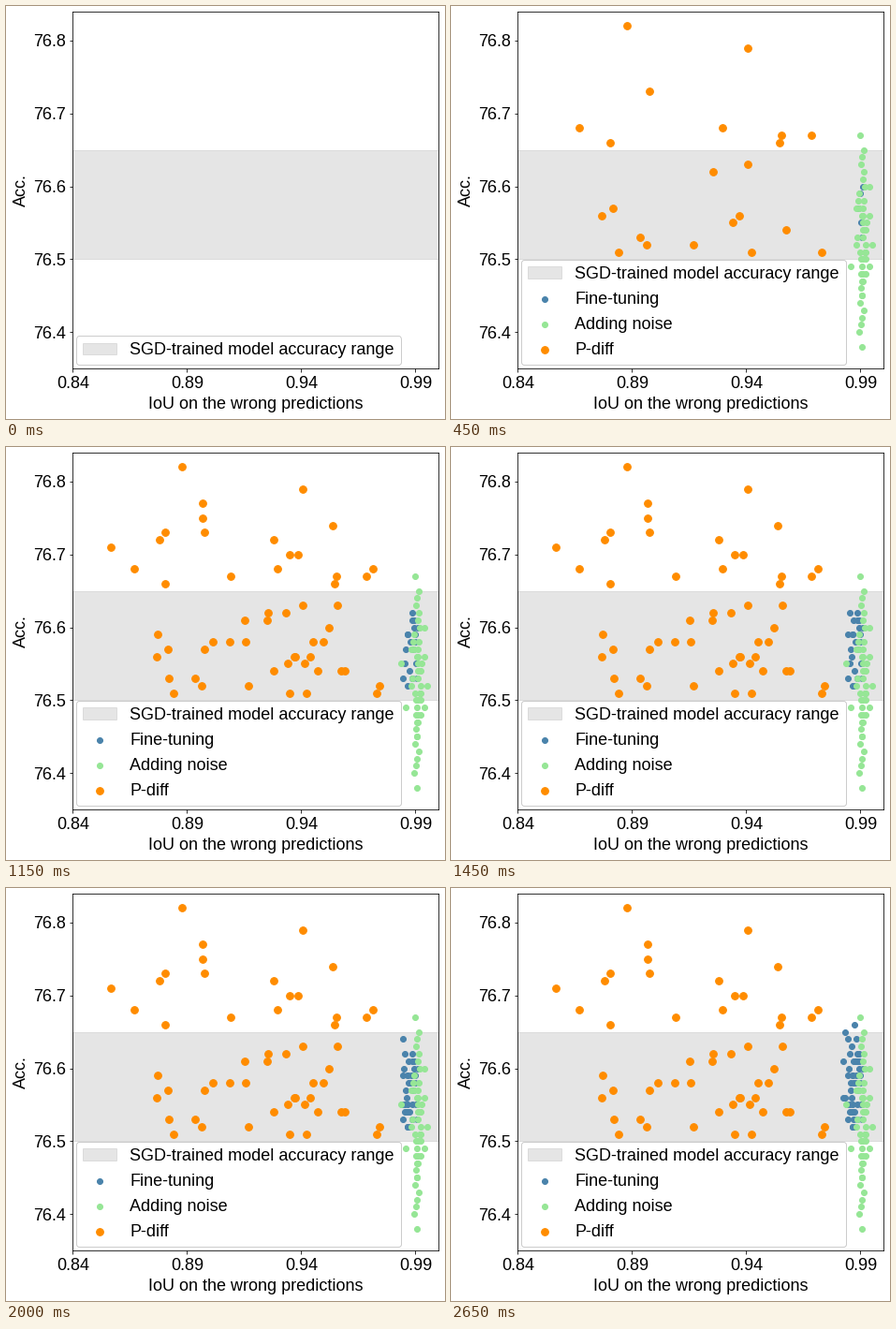
These frames come from a looping animation (469x441 px, 2.7 s). A matplotlib script:

```python
import math
import random

import matplotlib.pyplot as plt
from matplotlib.animation import FuncAnimation

W, H, DPI = 469, 441, 72
FRAMES, INTERVAL = 54, 50

plt.rcParams.update({"font.family": "Liberation Sans", "font.size": 18})

# P-diff results above the accuracy band: (IoU * 1e4, hundredths above 76).
HIGH = [(8880, 82), (9407, 79), (8975, 73), (8671, 68), (9296, 68),
        (8805, 66), (9544, 66), (9552, 67), (9685, 67), (8565, 71),
        (8968, 75), (8805, 73), (9280, 72), (9349, 70), (9388, 70),
        (9093, 67), (9712, 68), (8968, 77), (8780, 72), (9538, 74)]


def accuracy(hundredths):
    """Accuracies are reported to two decimals."""
    return 76 + round(hundredths) / 100


def fine_tuned(n=47):
    """Drifts away from IoU 0.99 while the accuracy range widens."""
    rng = random.Random(4)
    points = []
    for k in range(n):
        t = k / n
        iou = rng.gauss(0.9858 + 0.0045 * math.exp(-5 * t), 0.0018)
        points.append((max(iou, 0.9823), accuracy(rng.uniform(51, 61 + 6 * t))))
    return points


def noisy(n=51):
    """A dense column with long tails in accuracy, widest in the middle."""
    rng = random.Random(2)
    points = []
    for k in range(n):
        u = (2 * k + 1) / n - 1
        center = 0.9917 - (0.003 * u**6 if u < 0 else 0.0005 * u)
        spread = 0.0006 + 0.0018 * (1 - u * u) ** 2
        iou = min(rng.gauss(center, spread), 0.9975)
        points.append((iou, accuracy(52.5 + 8.5 * u + 6.5 * u**5)))
    rng.shuffle(points)
    return points


def diffused(n=54):
    """Two of every five results lie above the band, the rest inside it."""
    rng = random.Random(7)
    high = iter(HIGH)
    points = []
    for k in range(n):
        top = next(high, None) if k % 5 in (0, 2) else None
        if top:
            points.append((top[0] / 1e4, accuracy(top[1])))
        else:
            points.append((rng.triangular(0.856, 0.984, 0.945),
                           accuracy(rng.uniform(50, 64))))
    return points


# label, points, colour, marker area, points per frame, lag
SERIES = [
    ("Fine-tuning", fine_tuned(), "#4a83ab", 36, 0.95, 3.3),
    ("Adding noise", noisy(), "#96e696", 36, 5.5, 0),
    ("P-diff", diffused(), "darkorange", 60, 2.42, 0),
]

fig = plt.figure(figsize=(W / DPI, H / DPI), dpi=DPI, facecolor="white")
ax = fig.add_axes([71.3 / W, 54 / H, 390.6 / W, 381.2 / H])
ax.set_xlim(0.84, 1.0)
ax.set_ylim(76.35, 76.84)
xticks = [0.84 + 0.05 * k for k in range(4)]
yticks = [76.4 + 0.1 * k for k in range(5)]
ax.set_xticks(xticks, [f"{v:.2f}" for v in xticks])
ax.set_yticks(yticks, [f"{v:.1f}" for v in yticks])
ax.tick_params(axis="x", pad=4.5)
ax.set_xlabel("IoU on the wrong predictions", labelpad=5.5)
ax.set_ylabel("Acc.")

band = ax.axhspan(76.5, 76.65, color="gray", alpha=0.2,
                  label="SGD-trained model accuracy range")
clouds = []
for label, points, color, size, rate, lag in SERIES:
    dots = ax.scatter([], [], s=size, color=color, label=label)
    clouds.append((dots, points, rate, lag))


def update(i):
    handles = [band]
    for dots, points, rate, lag in clouds:
        count = max(1, round(rate * i - lag)) if i else 0
        dots.set_offsets(points[:count] or [(0, 0)])
        if i:
            handles.append(dots)
    ax.legend(handles=handles, loc="lower left", borderaxespad=0.2,
              labelspacing=0.56, framealpha=1)
    return [dots for dots, *_ in clouds]


anim = FuncAnimation(fig, update, frames=FRAMES, interval=INTERVAL,
                     repeat=True, repeat_delay=0, blit=False)
plt.show()
```
